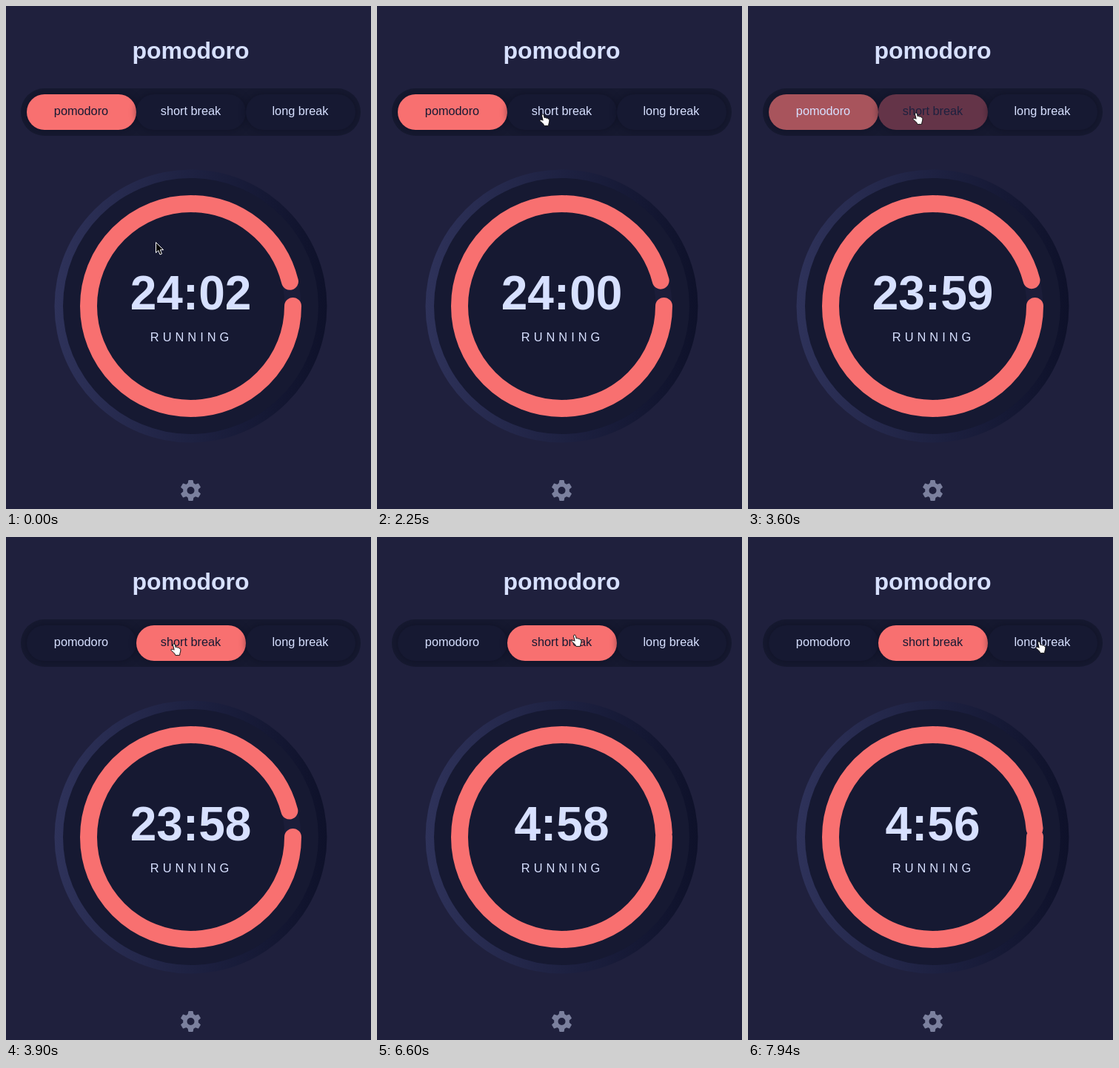
An HTML page for the animation above (8000 ms loop, 493 by 678 pixels).

```html
<!DOCTYPE html>
<html lang="en">
<head>
<meta charset="utf-8">
<title>pomodoro</title>
<style>
  html, body { margin: 0; width: 100%; height: 100%; overflow: hidden; background: #1f203d; }
  .stage { position: relative; width: 493px; height: 678px; overflow: hidden; }
  .tabs {
    position: absolute; left: 20px; top: 110.5px; width: 459px; height: 64px;
    border-radius: 32px; background: #161930; overflow: hidden;
  }
  .tab {
    position: absolute; top: 8px; width: 148px; height: 48px; border-radius: 24px;
    background: #161932; box-shadow: 0 0 10px rgba(10, 11, 28, .5);
  }
  .tab:nth-child(1) { left: 7.5px; }
  .tab:nth-child(2) { left: 155.5px; }
  .tab:nth-child(3) { left: 303.5px; }
  svg { position: absolute; left: 0; top: 0; }
  text { font-family: "Liberation Sans", Arial, sans-serif; fill: #d7e0ff; text-anchor: middle; }
  .title { font-size: 32px; font-weight: bold; }
  .label { font-size: 16.3px; }
  .clock { font-size: 64px; font-weight: bold; }
  .state { font-size: 16.4px; letter-spacing: 5px; text-anchor: start; }
</style>
</head>
<body>
<div class="stage">
  <div class="tabs">
    <div class="tab"></div>
    <div class="tab"></div>
    <div class="tab"></div>
  </div>
  <svg width="493" height="678" viewBox="0 0 493 678">
    <defs>
      <linearGradient id="rim">
        <stop offset="0" stop-color="#2e325a"/>
        <stop offset="1" stop-color="#0e112a"/>
      </linearGradient>
      <path id="tooth" d="M-3.2 -9.5 L-2.5 -13.2 H2.5 L3.2 -9.5 Z"/>
    </defs>

    <text class="title" x="249.5" y="71">pomodoro</text>
    <text class="label" x="101.5" y="147">pomodoro</text>
    <text class="label" x="249.5" y="147">short break</text>
    <text class="label" x="397.5" y="147">long break</text>

    <g transform="translate(249.5 404.5)">
      <circle r="184" fill="url(#rim)"/>
      <circle r="172.5" fill="#161932"/>
      <g fill="none" stroke-width="23">
        <circle r="138" stroke="#1b1d39" stroke-width="22"/>
        <circle id="progress" r="138" stroke="#f87070" stroke-linecap="round" pathLength="360"/>
      </g>
    </g>
    <text class="clock" id="clock" x="249.5" y="409"></text>
    <text class="state" x="194.8" y="452">RUNNING</text>

    <g transform="translate(249.5 653)" fill="#7b809e" stroke="#7b809e" stroke-linejoin="round">
      <circle r="7.7" fill="none" stroke-width="5.4"/>
      <g id="teeth" stroke-width="1.4"></g>
    </g>

    <path id="arrow" fill="#000" stroke="#fff" stroke-linejoin="round"
      d="M.5 .6 V14.6 L3.8 11.5 L6 17 L8.5 16 L6.3 10.7 H10.6 Z"/>
    <path id="hand" fill="#fff" stroke="#111" stroke-linejoin="round"
      d="M5.2 9.5 L3.6 3 Q3.3 1 4.8 .9 Q6 .9 6.4 2.6 L7.3 6 Q7.6 5.2 8.6 5.3
         Q9.6 5.4 9.8 6.4 Q10.3 5.7 11.2 6 Q12 6.3 12.1 7.2 Q13.6 6.8 13.8 8.4
         Q14.2 11 13 13.5 L12.6 16.4 H6.8 Q6 14 4.5 12.8 L1.4 10.2 Q.4 9 1.4 8.3 Q2.6 7.8 4 9"/>
  </svg>
</div>
<script>
  const LOOP = 8000;
  const LIGHT = '#d7e0ff', DARK = '#161932', CORAL = '#f87070';

  // [start ms, seconds left, session length]
  const ticks = [
    [0, 1442, 1500], [900, 1441, 1500], [1800, 1440, 1500], [2850, 1439, 1500],
    [3900, 1438, 1500], [4800, 299, 300], [5850, 298, 300], [6890, 297, 300], [7790, 296, 300]
  ];

  // [start ms, pointer, x, y]
  const moves = [
    [0, 'arrow', 202, 318], [1200, 'arrow', 202, 207], [1350, 'arrow', 215, 166],
    [1650, 'hand', 219, 144], [2250, 'hand', 219, 145], [2850, 'hand', 222, 144],
    [3150, 'hand', 222, 143], [6300, 'hand', 226, 143], [6450, 'hand', 232, 141],
    [6600, 'hand', 262, 131], [6740, 'hand', 296, 122], [6890, 'arrow', 314, 116],
    [7040, 'arrow', 338, 114], [7190, 'arrow', 370, 114], [7340, 'arrow', 381, 118],
    [7790, 'hand', 386, 132], [7940, 'hand', 388, 140]
  ];

  // [start ms, first tab, first label, second tab, second label]
  const switches = [
    [0, CORAL, DARK, DARK, LIGHT],
    [3600, '#a8545c', LIGHT, '#643448', '#1e213f'],
    [3750, DARK, LIGHT, CORAL, DARK]
  ];

  const byId = id => document.getElementById(id);
  const current = (steps, t) => steps.findLast(step => step[0] <= t);
  const tabs = document.querySelectorAll('.tab');
  const labels = document.querySelectorAll('.label');
  const pointers = { arrow: byId('arrow'), hand: byId('hand') };

  byId('teeth').innerHTML = Array.from({ length: 6 }, (_, i) =>
    `<use href="#tooth" transform="rotate(${i * 60})"/>`).join('');

  function paintTab(i, fill, ink) {
    tabs[i].style.background = fill;
    labels[i].style.fill = ink;
  }

  function draw(t) {
    const [, left, total] = current(ticks, t);
    byId('clock').textContent = `${Math.floor(left / 60)}:${String(left % 60).padStart(2, '0')}`;
    byId('progress').setAttribute('stroke-dasharray', `${360 * left / total} 360`);

    const [, fillA, inkA, fillB, inkB] = current(switches, t);
    paintTab(0, fillA, inkA);
    paintTab(1, fillB, inkB);

    const [, kind, x, y] = current(moves, t);
    for (const name in pointers) pointers[name].style.display = name === kind ? '' : 'none';
    pointers[kind].setAttribute('transform', `translate(${x} ${y})`);
  }

  const start = performance.now();
  function frame() {
    draw((performance.now() - start) % LOOP);
    requestAnimationFrame(frame);
  }
  frame();
</script>
</body>
</html>
```
